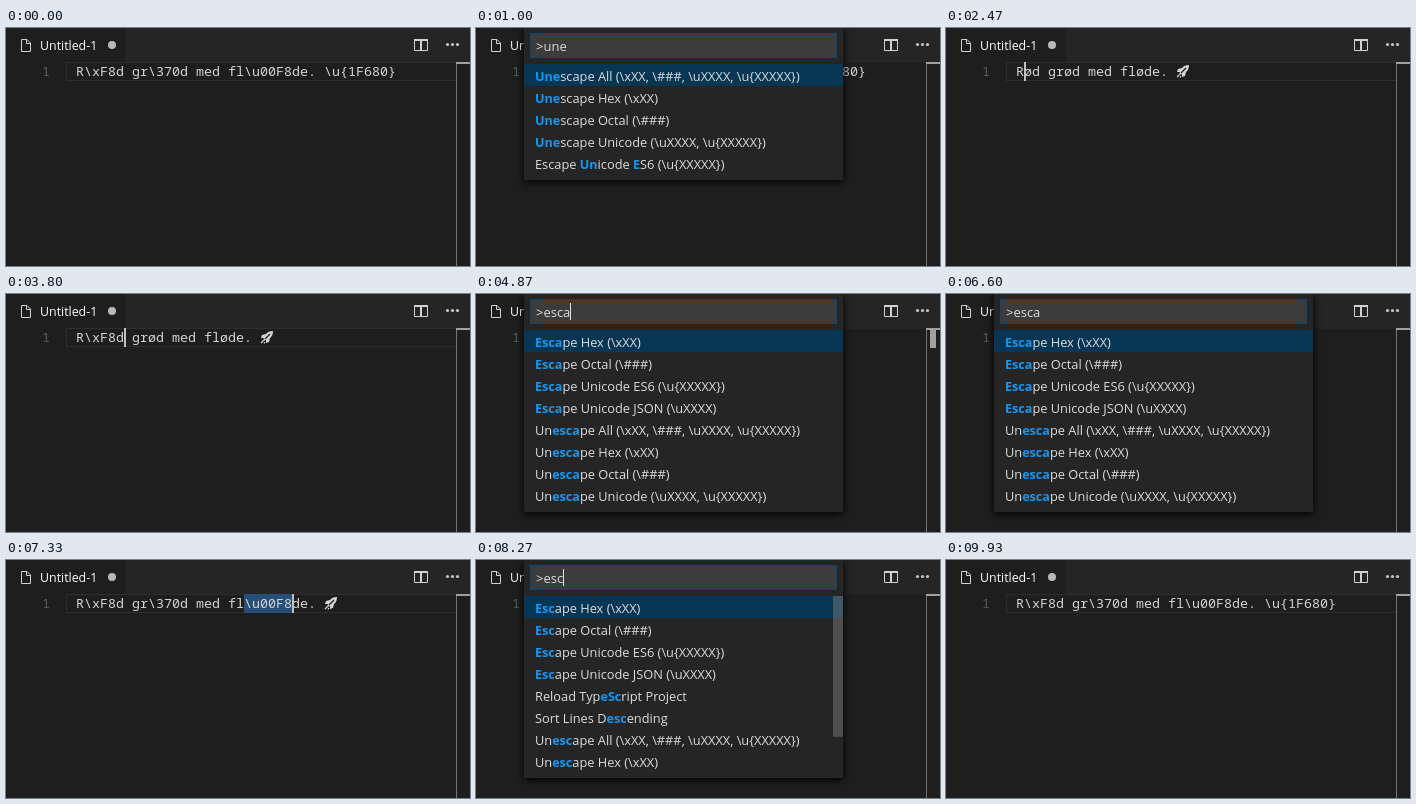
Recreate the animation shown at these times as an HTML page with a canvas. Size 464x238 px, loop 9.99 s.

```html
<!DOCTYPE html>
<html lang="en">
<head>
<meta charset="utf-8">
<title>Escape commands in an editor</title>
<style>
html, body { margin: 0; width: 100%; height: 100%; overflow: hidden; background: #1e1e1e; }
canvas { display: block; }
</style>
</head>
<body>
<canvas id="stage" width="464" height="238"></canvas>
<script>
const g = document.getElementById("stage").getContext("2d");
const LOOP = 9990, LEFT = 70, CELL = 8;
const LIST_TOP = 36, ROW = 22;
const UI = '"Open Sans", "Noto Sans", sans-serif';
const MONO = '13.33px "Noto Sans Mono", "DejaVu Sans Mono", monospace';

// [time, line content]
const edits = [
  [0, "R\\xF8d gr\\370d med fl\\u00F8de. \\u{1F680}"],
  [1930, "Rød grød med fløde. 🚀"],
  [3530, "R\\xF8d grød med fløde. 🚀"],
  [5330, "R\\xF8d gr\\370d med fløde. 🚀"],
  [7200, "R\\xF8d gr\\370d med fl\\u00F8de. 🚀"],
  [9000, "R\\xF8d gr\\370d med fl\\u00F8de. \\u{1F680}"]
];

// [time, column, selection anchor]
const moves = [
  [-660, 40], [1930, 22], [2330, 0], [2470, 1], [2600, 2, 1],
  [3530, 5, 1], [3670, 5], [3740, 6], [4070, 7], [4140, 8], [4200, 9], [4270, 10, 9],
  [5330, 13, 9], [5530, 14], [5600, 18], [5670, 19], [5730, 20], [5800, 21], [5870, 22, 21],
  [7200, 27, 21], [7470, 29], [7540, 30], [7600, 31], [7670, 33, 31],
  [9000, 40, 31], [9330, 40]
];

const palettes = [
  { open: 470, close: 1870, query: "unes", step: 150, downs: 0 },
  { open: 2670, close: 3470, query: "esca", step: 110, downs: 0 },
  { open: 4470, close: 5270, query: "esca", step: 95, downs: 1 },
  { open: 6070, close: 7130, query: "esca", step: 110, downs: 3 },
  { open: 7870, close: 8930, query: "esca", step: 110, downs: 2 }
];

const commands = [
  "Add Cursor Above", "Add Cursor Below", "Add Cursors to Line Ends", "Add Line Comment",
  "Change End of Line Sequence", "Change File Encoding", "Change Language Mode", "Close Editor",
  "Escape Hex (\\xXX)", "Escape Octal (\\###)",
  "Escape Unicode ES6 (\\u{XXXXX})", "Escape Unicode JSON (\\uXXXX)",
  "Reload TypeScript Project", "Sort Lines Descending",
  "Unescape All (\\xXX, \\###, \\uXXXX, \\u{XXXXX})", "Unescape Hex (\\xXX)",
  "Unescape Octal (\\###)", "Unescape Unicode (\\uXXXX, \\u{XXXXX})"
];

const latest = (list, t) => list.filter(e => e[0] <= t).pop();

function box(color, x, y, w, h) {
  g.fillStyle = color;
  g.fillRect(x, y, w, h);
}

function text(s, x, y, font, color) {
  g.font = font;
  g.fillStyle = color;
  g.fillText(s, x, y);
  return x + g.measureText(s).width;
}

function dot(x, y, r, color) {
  g.fillStyle = color;
  g.beginPath();
  g.arc(x, y, r, 0, 7);
  g.fill();
}

function stroke(path, color, width = 1) {
  g.strokeStyle = color;
  g.lineWidth = width;
  g.stroke(new Path2D(path));
}

function rocket(x) {
  g.save();
  g.translate(x, 36);
  g.fillStyle = "#d4d4d4";
  g.fill(new Path2D("M13 1Q8 1 6 4L2 5 1 8 4 8 3 11 6 10 6 13 9 12 10 8Q13 6 13 1Z"));
  stroke("M5 9L10 4", "#1e1e1e", 1.2);
  stroke("M1 13L3.5 10.5M4 13.5L5 12", "#d4d4d4", 1.2);
  g.restore();
}

function drawTabs() {
  box("#252526", 0, 0, 464, 35);
  box("#1e1e1e", 0, 0, 120, 35);
  stroke("M15.5 11.5H21L24.5 15V23.5H15.5ZM20.5 11.5V15.5H24.5", "#d0d0d0");
  text("Untitled-1", 34, 22, "12.4px " + UI, "#ffffff");
  dot(106, 17, 4, "#b8b8b8");
  stroke("M408.5 11.5H421.5V22.5H408.5Z", "#d0d0d0");
  stroke("M408 12H422M415 12V22", "#d0d0d0", 2);
  for (const x of [441.5, 446.5, 451.5]) dot(x, 16.5, 1.6, "#c5c5c5");
}

function drawEditor(t, focused) {
  const line = latest(edits, t)[1];
  const [since, col, anchor] = latest(moves, t);
  const mark = (color, a, b) => box(color, LEFT + a * CELL, 34, (b - a) * CELL, 19);
  let repeats = 0;

  if (focused) {
    g.strokeStyle = "#2d2d2d";
    g.lineWidth = 1;
    g.strokeRect(60.5, 34.5, 390, 18);
  }
  if (anchor !== undefined) {
    const chosen = line.slice(anchor, col);
    for (let i = line.indexOf(chosen); i >= 0; i = line.indexOf(chosen, i + 1)) {
      mark("#33393f", i, i + chosen.length);
      repeats++;
    }
    mark(focused ? "#264f78" : "#3a3d41", anchor, col);
  } else if (t >= 3930 && t < 4070) {
    mark("#3a3a3a", 2, 6);
  }

  text("1", 36, 48, MONO, "#5a5a5a");
  [...line].forEach((c, i) => {
    const x = LEFT + i * CELL;
    if (c === "🚀") rocket(x);
    else text(c, x, 48, MONO, "#d4d4d4");
  });
  if (focused && (t - since) % 1000 < 500) box("#c0c0be", LEFT + col * CELL, 34, 2, 19);

  // overview ruler
  box("#747474", 450, 34, 1, 204);
  if (repeats > 1) box("#a0a0a0", 454, 34, 6, 20);
  box("#a0a0a0", 450, 34, 14, 2);
}

// Returns the highlighted [from, to] ranges, or null when nothing matches.
function match(label, query) {
  const s = label.toLowerCase(), at = s.indexOf(query);
  if (at >= 0) return [[at, at + query.length]];
  for (let k = query.length - 1; k > 0; k--) {
    const head = query.slice(0, k), tail = query.slice(k);
    const m = s.match(new RegExp("\\b" + head + "\\w* " + tail));
    if (m) {
      const end = m.index + m[0].length;
      return [[m.index, m.index + k], [end - tail.length, end]];
    }
  }
  return null;
}

function drawLabel(label, ranges, y) {
  let x = 59, i = 0;
  const plain = to => { x = text(label.slice(i, to), x, y, "12.8px " + UI, "#dcdcdc"); };
  for (const [a, b] of ranges) {
    plain(a);
    x = text(label.slice(a, b), x, y, "bold 12.6px " + UI, "#1198f4");
    i = b;
  }
  plain(label.length);
}

function drawPalette(p, t) {
  const age = t - p.open;
  const query = p.query.slice(0, Math.floor(age / p.step));
  const found = commands
    .map(label => ({ label, ranges: match(label, query) }))
    .filter(c => c.ranges)
    .sort((a, b) => (a.ranges[0][0] > 0) - (b.ranges[0][0] > 0));
  const rows = found.slice(0, 8);
  const picked = Math.max(0, Math.min(p.downs, Math.floor((age - 550) / 100)));

  g.save();
  g.shadowColor = "#000";
  g.shadowBlur = 8;
  g.shadowOffsetY = 2;
  box("#252526", 48, 0, 319, 42 + rows.length * ROW);
  g.restore();

  box("#0c4672", 54, 5, 307, 25);
  box("#3c3c3c", 55, 6, 305, 23);
  const end = text(">" + query, 60, 23, "13px " + UI, "#dcdcdc");
  if (age % 1000 < 500) box("#e0e0e0", Math.round(end), 9, 1, 17);

  rows.forEach((row, i) => {
    const y = LIST_TOP + i * ROW;
    if (i === picked) box("#073655", 48, y, 319, ROW);
    drawLabel(row.label, row.ranges, y + 17);
  });
  if (found.length > 8)
    box("rgba(121,121,121,.5)", 357, LIST_TOP, 10, ROW * 64 / found.length);
}

function draw(now) {
  const t = now % LOOP;
  const p = palettes.find(p => t >= p.open && t < p.close);
  box("#1e1e1e", 0, 0, 464, 238);
  drawTabs();
  drawEditor(t, !p);
  if (p) drawPalette(p, t);
}

let start;
function tick(now) {
  start ??= now;
  draw(now - start);
  requestAnimationFrame(tick);
}
requestAnimationFrame(tick);
</script>
</body>
</html>
```
